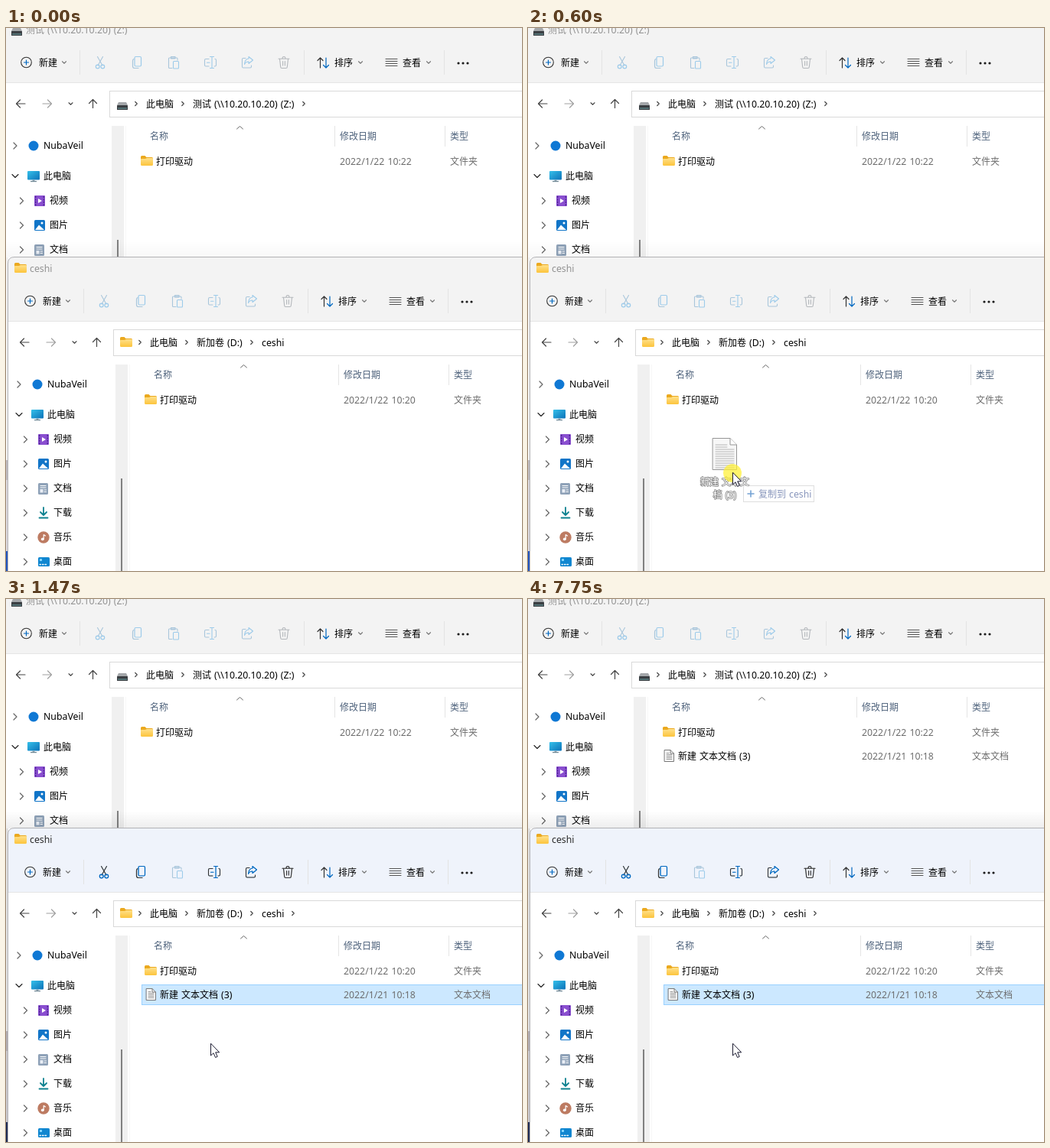
Write an HTML page that moves like this. It is 674x710 px and loops after 8 s.

```html
<!DOCTYPE html>
<html lang="zh">
<head>
<meta charset="utf-8">
<title>文件夹同步</title>
<style>
html, body { margin: 0; width: 100%; height: 100%; overflow: hidden; background: #fff; }
svg { display: block; width: 100%; height: 100%; }
text { font: 12px "Noto Sans CJK SC", "Noto Sans CJK", sans-serif; white-space: pre; }
.l { font: 12.3px "Noto Sans", "Open Sans", sans-serif; word-spacing: .8px; }
</style>
</head>
<body>
<svg id="stage" viewBox="0 0 674 710" xmlns="http://www.w3.org/2000/svg"></svg>
<script>
const LOOP = 8000;
const INK = '#000', DIM = '#6d6d6d', HEAD = '#4c607a';

// Drawing helpers
const path = (d, stroke, w = 1, fill = 'none', extra = '') =>
  `<path d="${d}" fill="${fill}" stroke="${stroke}" stroke-width="${w}" stroke-linecap="round" stroke-linejoin="round" ${extra}/>`;
const rect = (x, y, w, h, fill, extra = '') =>
  `<rect x="${x}" y="${y}" width="${w}" height="${h}" fill="${fill}" ${extra}/>`;
const disc = (x, y, r, fill, extra = '') =>
  `<circle cx="${x}" cy="${y}" r="${r}" fill="${fill}" ${extra}/>`;
const group = (id, body) => `<g id="${id}">${body}</g>`;
const at = (x, y, body) => `<g transform="translate(${x} ${y})">${body}</g>`;
const text = (x, mid, s, fill = INK, extra = '') =>
  `<text x="${x}" y="${mid + 5}" fill="${fill}" ${extra}>` +
  s.replace(/[\x20-\x7e]+/g, m => `<tspan class="l">${m}</tspan>`) + '</text>';

const chevRight = (x, y, s = 2.5, c = '#444') => path(`M${x - s / 2} ${y - s}l${s} ${s} ${-s} ${s}`, c, 1.2);
const chevDown = (x, y, s = 2.5, c = '#777') => path(`M${x - s} ${y - s / 2}l${s} ${s} ${s} ${-s}`, c, 1.1);

// Small icons, each with its own top-left origin
const folder = (x, y) => at(x, y,
  path('M0 1.5Q0 0 1.5 0H5.5L7.5 2H14.5Q16 2 16 3.5V11H0Z', 'none', 0, '#eba91f') +
  path('M0 4.5Q0 4 1 4H6L8 3H15Q16 3 16 4V11.5Q16 13 14.5 13H1.5Q0 13 0 11.5Z', 'none', 0, 'url(#gold)'));
const drive = (x, y) => at(x, y,
  path('M2 0H12L14 4H0Z', 'none', 0, '#a4a7aa') + rect(0, 4, 14, 6, '#3a3e42', 'rx=".5"') +
  rect(1, 7.5, 12, 1, '#6fa5a8'));
const page = (x, y, lines) => at(x, y,
  path('M.5 .5H8L12.5 5V15.5H.5Z', '#777', 1, '#fdfdfd') + path('M8 .5V5H12.5', '#777') +
  (lines ? path('M3 4.5H6M3 6.5H10M3 8.5H10M3 10.5H10M3 12.5H10', '#8a8a8a', .9) : ''));
const screen = (x, y) => at(x, y,
  rect(0, 0, 16, 11.5, 'url(#sky)', 'rx="1"') + rect(6.5, 11.5, 3, 2, '#8aa0ad') + rect(4, 13, 8, 1.2, '#6f8794'));
const film = (x, y) => at(x, y,
  rect(0, 0, 14, 14, '#8a4fd0', 'rx="1"') + path('M5 4V10L10 7Z', 'none', 0, '#fff') +
  path('M1.7 1.5V13M12.3 1.5V13', '#4d2391', 1.4, 'none', 'stroke-dasharray="1 2.4"'));
const photo = (x, y) => at(x, y,
  rect(0, 0, 14, 14, '#1175c8', 'rx="1.5"') + path('M1 13L6 6.5 13 13Z', 'none', 0, '#fff') +
  disc(10, 4, 1.5, '#fff'));
const doc = (x, y) => at(x, y,
  rect(0, 0, 13, 15, '#8fa2b8', 'rx="1.5"') + path('M3 3.5H10M3 6H10', '#fff') +
  rect(2.5, 8, 4, 4.5, '#e9eef5') + path('M8 9H10.5M8 11.5H10.5', '#fff'));
const download = (x, y) =>
  path(`M${x + 7} ${y}V${y + 10}M${x + 3} ${y + 6}l4 4 4 -4M${x + 1.5} ${y + 13.5}h11`, '#0f8290', 1.8);
const music = (x, y) => at(x, y,
  disc(7, 7, 7.7, '#bd7b62') + disc(5.8, 9.3, 1.9, '#fff') + path('M7.2 9V3.5L9.5 5', '#fff', 1.2));
const desk = (x, y) => at(x, y + 1,
  rect(0, 0, 15, 12, '#0f86d0', 'rx="1.5"') + path('M2 9.5H3.5M5.5 9.5H7M9 9.5H10.5', '#fff', 1.3) +
  rect(2, 2, 3, 3, '#7fd3ff'));

// Toolbar glyphs: body colour b, accent colour a
const glyphs = {
  cut: (b, a) => path('M124.5 349.5L131 361M131.5 349.5L125 361', b, 1.1) +
    path('M122.3 362.5a2.4 2.4 0 1 0 4.8 0a2.4 2.4 0 1 0 -4.8 0M128.9 362.5a2.4 2.4 0 1 0 4.8 0a2.4 2.4 0 1 0 -4.8 0', a, 1.2),
  copy: (b, a) => path('M172 352.5Q170.5 353 170.5 355V362Q170.5 364.5 173 364.5H178', b, 1.2) +
    path('M174.5 349.5H180Q181.5 349.5 181.5 351V360.5Q181.5 362 180 362H174.5Q173 362 173 360.5V351Q173 349.5 174.5 349.5Z', a, 1.2),
  paste: (b, a) => path('M222 364.5H218.5Q217.5 364.5 217.5 363.5V352Q217.5 351 218.5 351H228Q229 351 229 352V354M220.5 349.5H226V352H220.5Z', b, 1.1) +
    rect(223.5, 355.5, 7, 9.5, 'none', `rx="1" stroke="${a}" stroke-width="1.1"`),
  rename: (b, a) => path('M270 352.5H266Q264.5 352.5 264.5 354V360.5Q264.5 362 266 362H270M278 352.5Q279.5 352.5 279.5 354V360.5Q279.5 362 278 362H277', b, 1.1) +
    path('M271.5 349.5H276.5M274 349.5V364.5M271.5 364.5H276.5M267.5 357.3H271', a, 1.1),
  share: (b, a) => path('M318 351.5H315Q313.5 351.5 313.5 353V362.5Q313.5 364 315 364H324Q325.5 364 325.5 362.5V361', b, 1.1) +
    path('M322 349.5L327.5 354 322 358.5V356Q318 356 316.5 359.5Q317 352.5 322 352Z', a, 1.1),
  trash: b => path('M361 352.3H375M366 352Q366 349.5 368 349.5Q370 349.5 370 352M362.5 352.5L363.7 363Q363.8 364.5 365.2 364.5H370.8Q372.2 364.5 372.3 363L373.5 352.5M366.6 355.5V361M369.4 355.5V361', b, 1.1)
};
const tools = (body, accent, trash, names) =>
  names.map(n => glyphs[n](n === 'trash' ? trash : body, accent)).join('');
const ALL = Object.keys(glyphs), LIVE = ALL.filter(n => n !== 'paste');

const sideItems = [
  ['视频', film], ['图片', photo], ['文档', doc], ['下载', download], ['音乐', music], ['桌面', desk]
];

const sidebar = () =>
  chevRight(17, 466, 4, '#666') + disc(41, 466, 6.5, '#0f78d4') + text(54, 465, 'NubaVeil') +
  chevDown(17, 505.5, 4, '#222') + screen(33, 499) + text(54, 505, '此电脑') +
  sideItems.map(([name, icon], i) => {
    const y = 537 + 32 * i;
    return chevRight(25.5, y + 1, 4, '#666') + icon(42, y - 6) + text(62, y, name);
  }).join('') +
  rect(143, 440, 16, 280, '#f0f0f0') + rect(150, 589, 2, 140, '#808080') +
  rect(161, 440, 1, 280, '#f7f7f7');

const toolbar = () =>
  disc(31.5, 357, 6.8, 'none', 'stroke="#333" stroke-width="1.1"') +
  path('M28.5 357H34.5M31.5 354V360', '#0067c0', 1.2) +
  text(48, 357, '新建') + chevDown(81, 357) +
  tools('#a9c6db', '#9dcbea', '#b4b8bc', ALL) +
  [101, 394, 577].map(x => rect(x, 341, 1, 32, '#e3e3e3')).join('') +
  path('M415.5 364V351M412 354.5L415.5 351 419 354.5', '#333', 1.2) +
  path('M423 351V364M419.5 360.5L423 364 426.5 360.5', '#0067c0', 1.2) +
  text(434, 357, '排序') + chevDown(468, 357) +
  path('M501 352.5H516M501 355.5H516M501 358.5H516M501 361.5H516', '#555', 1) +
  text(523, 357, '查看') + chevDown(557, 357) +
  [596, 602, 608].map(x => disc(x, 358, 1.6, '#1b1b1b')).join('');

const navbar = () =>
  path('M30 411H18.5M23.5 406L18.5 411 23.5 416', '#444', 1.2) +
  path('M53 411H64.5M59.5 406L64.5 411 59.5 416', '#a0a0a0', 1.2) +
  chevDown(89.5, 411, 2.5, '#444') +
  path('M118.5 416.5V405.5M113.5 410.5L118.5 405.5 123.5 410.5', '#444', 1.2) +
  rect(140.5, 394.5, 560, 34, '#fff', 'stroke="#d9d9d9"') +
  chevRight(175, 411) + text(188, 411, '此电脑') + chevRight(236, 411);

const columns = () =>
  text(193, 453, '名称', HEAD) + path('M306.5 444L310.5 440.5 314.5 444', '#666', 1) +
  text(441, 453, '修改日期', HEAD) + text(585, 453, '类型', HEAD) +
  [434, 578].map(x => rect(x, 440, 1, 27, '#e5e5e5')).join('');

const row = (id, icon, name, date, type) => group(id,
  icon + text(201, 486, name) + text(441, 486, date, DIM) + text(585, 486, type, DIM));

const fileRows = (id, stamp) =>
  row(id + 'Dir', folder(181, 479), '打印驱动', stamp, '文件夹') +
  row(id + 'Lock', page(183, 478), 'sync.ffs_lock', '2022/1/22 11:09', 'FFS_LOCK 文件') +
  row(id + 'File', page(183, 478, true), '新建 文本文档 (3)', '2022/1/21 10:18', '文本文档');

const explorer = (id, titleIcon, title, crumbs, marks, stamp) =>
  rect(3, 383, 680, 340, '#fff') + rect(3, 383, 680, 1, '#e5e5e5') +
  titleIcon + text(31, 314, title, '#929292', `id="${id}Title"`) +
  toolbar() + navbar() + crumbs + sidebar() + columns() + marks + fileRows(id, stamp);

const share = '测试 (\\\\10.20.10.20) (Z:)';
const upper = at(-5, -312,
  rect(0, 290, 690, 93, '#f3f3f3') +
  explorer('top', drive(12, 312), share,
    drive(150, 409) + text(249, 411, share) + chevRight(394, 411), '', '2022/1/22 10:22'));

const frame = 'M3 720V308Q3 300 11 300H690V720Z';
const lower =
  rect(0, 565, 3, 26, '#c9c4c9') + rect(0, 591, 3, 93, '#e6e3e8') + rect(0, 684, 3, 26, '#2254bd') +
  rect(0, 684, 3, 26, '#1f2c55', 'id="edge"') +
  group('shade', rect(0, 277, 674, 23, 'url(#fall)') + rect(0, 300, 3, 384, '#000', 'opacity=".12"')) +
  `<path id="body" d="${frame}" fill="#f3f3f3"/>` +
  explorer('low', folder(11, 307), 'ceshi',
    folder(149, 404) + text(249, 411, '新加卷 (D:)') + chevRight(321, 411) + text(334, 411, 'ceshi'),
    rect(177.5, 473.5, 520, 26, 'none', 'id="focus" stroke="#bdbdbd"') +
    rect(177.5, 504.5, 520, 26, '#cce8ff', 'id="select" stroke="#99d1ff"'),
    '2022/1/22 10:20') +
  group('lowOn', tools('#333', '#0067c0', '#333', LIVE) + chevRight(375, 411)) +
  path('M2.5 720V308Q2.5 299.5 11 299.5H690', '#b2b2b5');

const label = 'text-anchor="middle" stroke="#777" stroke-width="1.6" stroke-linejoin="round" paint-order="stroke"';
const ghostLines = Array.from({ length: 11 }, (_, i) => `M-22 ${-36 + i * 3}H${i < 2 ? -7 : 2}`).join('');
const ghost = group('ghost',
  path('M-25.5 -44.5H-3L5.5 -36V-3.5H-25.5Z', '#8a8a8a', 1, '#f7f7f7') +
  path(ghostLines, '#a5a5a5', .9) + path('M-3 -44.5V-36H5.5', '#8a8a8a', 1, '#fff') +
  text(-10, 12, '新建 文本文', '#fff', label) + text(-10, 29, '档 (3)', '#fff', label) +
  disc(0, 1, 12, '#ffee1c', 'opacity=".72"'));
const badge = group('badge', path('M2.5 19H9.5M6 15.5V22.5', '#333', 1.2));
const tip = group('tip',
  rect(14.5, 17.5, 92, 21, '#fff', 'stroke="#c8c8c8"') +
  path('M20 28H28M24 24V32', '#1a66b8', 1.6) + text(34, 28, '复制到 ceshi', '#39508f'));
const arrow = path('M.5 .5V16L4 12.7 6.6 18.5 9.2 17.3 6.7 11.8H11.3Z', '#1d1d33', 1, '#fff');

const stage = document.getElementById('stage');
stage.innerHTML = `<defs>
<linearGradient id="gold" x2="0" y2="1"><stop stop-color="#ffe08a"/><stop offset="1" stop-color="#fcc43c"/></linearGradient>
<linearGradient id="sky" x2="1" y2="1"><stop stop-color="#35c0ea"/><stop offset="1" stop-color="#0c72b8"/></linearGradient>
<linearGradient id="fall" x2="0" y2="1"><stop stop-opacity="0"/><stop offset="1" stop-opacity=".07"/></linearGradient>
</defs>` + rect(0, 0, 674, 710, '#fff') + upper + lower + group('pointer', ghost + badge + tip + arrow);

const el = {};
stage.querySelectorAll('[id]').forEach(n => el[n.id] = n);

const show = (id, on) => el[id].setAttribute('opacity', +on);
const move = (id, x, y) => el[id].setAttribute('transform', `translate(${x} ${y})`);
const mix = (a, b, k) => `rgb(${a.map((v, i) => Math.round(v + (b[i] - v) * k))})`;
// Last entry whose time has come
const step = (list, t) => list.filter(e => e[0] <= t).pop();

const trail = [[0, 47, 537], [400, 128, 554], [470, 206, 569], [540, 246, 577], [600, 267, 581]];
const wake = [[0, 0], [860, .3], [930, .5], [1010, .6], [1080, .8], [1150, 1]];
const enable = [[0, 0], [1330, .35], [1400, .7], [1470, 1]];
const hint = [[0, 0], [600, .6], [670, 1], [860, 0]];

function draw(t) {
  const [, x, y] = step(trail, t);
  const active = step(wake, t)[1];
  const drag = t >= 330 && t < 860;
  const dropped = t >= 1080, locked = t >= 2410 && t < 7750, done = t >= 7750;
  const sorted = t >= 2870 && locked;

  show('pointer', t >= 330);
  move('pointer', x, y);
  show('ghost', drag * .9);
  show('badge', drag && t < 600);
  show('tip', step(hint, t)[1]);

  el.body.setAttribute('fill', mix([243, 243, 243], [239, 243, 251], active));
  el.lowTitle.setAttribute('fill', active ? '#2b2b2b' : '#929292');
  show('shade', .45 + .55 * active);
  show('edge', active);
  show('lowOn', step(enable, t)[1]);

  show('focus', t >= 860 && !dropped);
  show('select', dropped);
  move('select', 0, sorted ? 31 : 0);
  show('lowFile', dropped);
  move('lowFile', 0, sorted ? 62 : 31);
  show('lowLock', locked);
  move('lowLock', 0, sorted ? 31 : 62);

  show('topLock', locked);
  move('topLock', 0, 31);
  show('topFile', done);
  move('topFile', 0, 31);
}

const start = performance.now();
function tick() {
  draw((performance.now() - start) % LOOP);
  requestAnimationFrame(tick);
}
tick();
</script>
</body>
</html>
```
